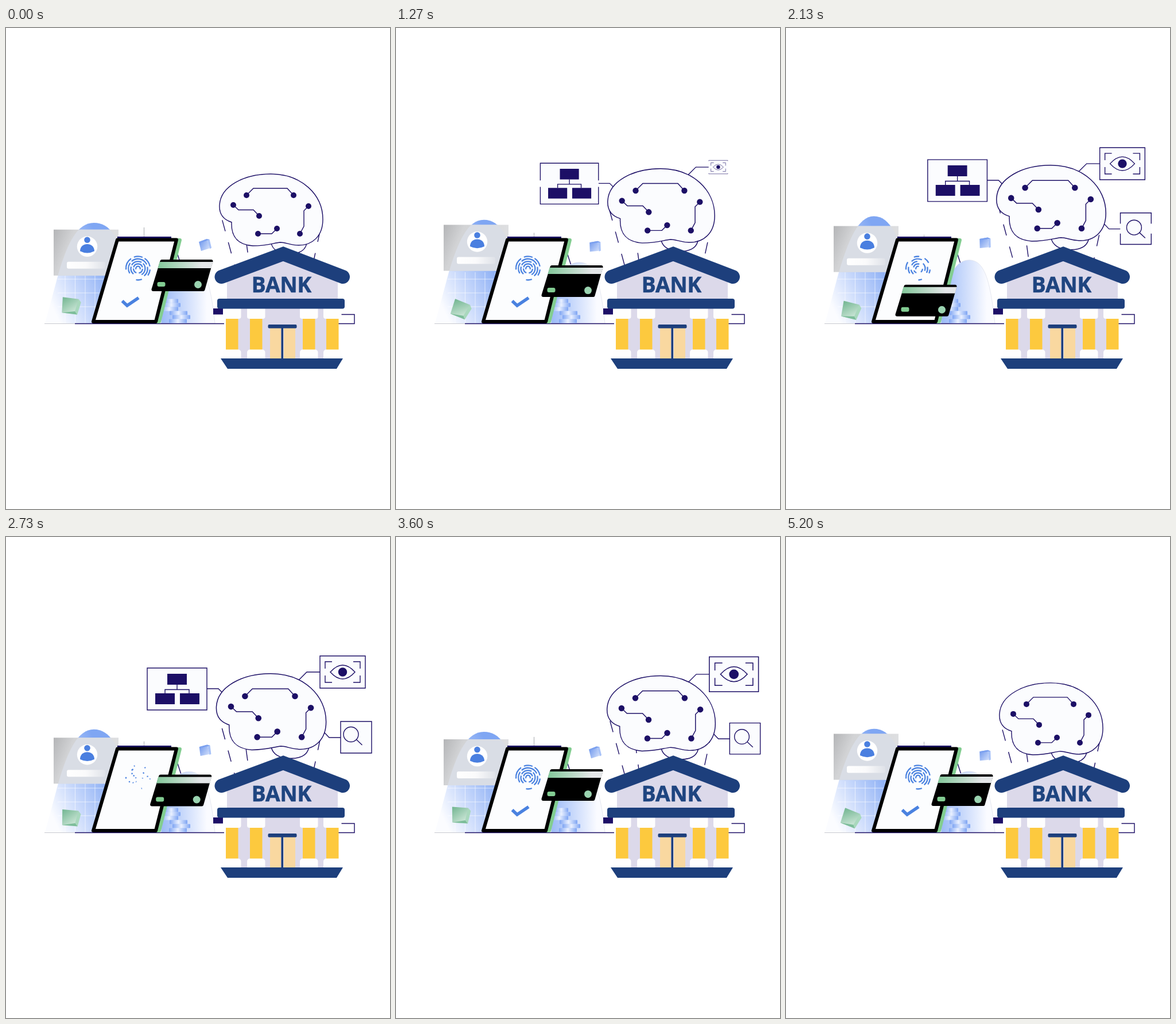
Write an HTML page that moves like this. It is 669x837 px and loops after 5270 ms.

```html
<!DOCTYPE html>
<html lang="en">
<head>
<meta charset="utf-8">
<title>Digital bank</title>
<style>
  html, body { margin: 0; width: 100%; height: 100%; overflow: hidden; background: #fff; }
  svg { display: block; width: 669px; height: 837px; }
  .ink { fill: none; stroke: #1c0f66; stroke-width: 1.4; }
  .solid { fill: #1c0f66; }
  .pale { fill: #fbfcfe; }
  .navy { fill: #1d3f7c; }
  .print { fill: none; stroke: #4a82e0; stroke-width: 2.3; }
</style>
</head>
<body>
<svg viewBox="0 0 669 837">
  <defs>
    <linearGradient id="hill" gradientUnits="userSpaceOnUse" x1="78" y1="480" x2="190" y2="425">
      <stop stop-color="#fbfcff"/><stop offset=".45" stop-color="#c3d5fb"/><stop offset="1" stop-color="#7fa6f3"/>
    </linearGradient>
    <linearGradient id="hill2" gradientUnits="userSpaceOnUse" x1="272" y1="0" x2="350" y2="0">
      <stop stop-color="#9dbbf8"/><stop offset="1" stop-color="#fafbff"/>
    </linearGradient>
    <linearGradient id="gray" x2="1" y2=".3">
      <stop stop-color="#b4b5b7"/><stop offset=".3" stop-color="#d2d3d5"/><stop offset="1" stop-color="#dfe0e2"/>
    </linearGradient>
    <linearGradient id="pill"><stop stop-color="#fff"/><stop offset=".5" stop-color="#fafafb"/><stop offset="1" stop-color="#dfe2e8"/></linearGradient>
    <linearGradient id="coin">
      <stop stop-color="#7fa5f3"/><stop offset=".5" stop-color="#e9f0ff"/><stop offset="1" stop-color="#7fa5f3"/>
    </linearGradient>
    <linearGradient id="stripe"><stop stop-color="#83c79a"/><stop offset=".8" stop-color="#e4e6e8"/></linearGradient>
    <linearGradient id="jade" x2="1" y2="1"><stop stop-color="#6fb48f"/><stop offset="1" stop-color="#dff0e6"/></linearGradient>
    <linearGradient id="azure" x2="1" y2="1"><stop stop-color="#6c95ec"/><stop offset="1" stop-color="#d3e0fb"/></linearGradient>
    <clipPath id="inHill"><path id="hillClip"/></clipPath>
  </defs>

  <!-- ground -->
  <path d="M67 514.5H120" stroke="#c9cad0"/>
  <path class="ink" d="M584 498.500H607V514.500H570"/>

  <!-- left hill with profile card -->
  <path id="hillL" fill="url(#hill)"/>
  <g clip-path="url(#inHill)" stroke="#fff" stroke-opacity=".6">
    <path d="M103 425V514M120.500 425V514M138 425V514M155 425V514M173 425V514M90 437H200M90 461H200M90 485H200"/>
  </g>
  <g id="profile">
    <rect x="83" width="113" height="80" fill="url(#gray)"/>
  </g>
  <g clip-path="url(#inHill)">
    <rect id="glass" x="83" width="113" height="80" fill="#d9dde5"/>
  </g>
  <g id="user">
    <circle cx="141.500" cy="29.500" r="17.700" fill="#fff"/>
    <g fill="#4a7fe0">
      <circle cx="141.500" cy="18" r="5.300"/>
      <path d="M129 37.500C129 21 154 21 154 37.500Q141.500 44 129 37.500Z"/>
    </g>
    <rect x="106" y="56" width="67" height="12" rx="3" fill="url(#pill)"/>
  </g>

  <!-- right hill and coins -->
  <path class="ink" stroke-width="3" d="M290 366L306 416"/>
  <path id="hillR" fill="url(#hill2)" stroke="#dcdfe8" stroke-width=".7"/>
  <path class="ink" d="M120 514.500H380"/>
  <path class="solid" d="M361 488H380V498.500H361Z"/>
  <g id="coins" fill="url(#coin)"></g>

  <!-- tablet -->
  <path id="rod" stroke="#a9abb0"/>
  <path class="solid" d="M194 363H288V366H194Z"/>
  <path d="M200 369H303L267 511H160Z" fill="#82cd90" stroke="#82cd90" stroke-width="6" stroke-linejoin="round"/>
  <path d="M194 368.500H297L261 511H152Z" fill="#fcfdfe" stroke="#000" stroke-width="6" stroke-linejoin="round"/>
  <g id="finger"></g>
  <path id="tick" class="print" style="stroke-width:5.500" pathLength="1" d="M202.500 475L211 483L231 469.500"/>

  <!-- payment card -->
  <g id="card">
    <path d="M18 3H104L90 52H3Z" stroke="#000" stroke-width="6" stroke-linejoin="round"/>
    <path d="M14 4H107L104 15H11Z" fill="url(#stripe)"/>
    <rect x="10" y="39" width="14" height="8" rx="3" fill="#82cc92"/>
    <circle cx="81" cy="43.500" r="6.500" fill="#9ad3b0"/>
  </g>

  <g id="cubeG">
    <path d="M-15 -13L13 -14L15 13L-12 14Z" fill="url(#jade)"/>
    <path d="M13 -14L18 -9L15 13L10 8Z" fill="#a9d8bd"/>
    <path d="M-12 14L10 8L15 13Z" fill="#7dbd9a"/>
  </g>
  <g id="cubeB">
    <path d="M-9 -7L5 -9L7 8L-9 9Z" fill="url(#azure)"/>
    <path d="M5 -9L10 -7L10 8L7 9Z" fill="#a9c3f8"/>
    <path d="M-9 -7L5 -9L10 -7L-4 -5Z" fill="#7ba0ef"/>
  </g>

  <!-- callouts -->
  <g id="calls"></g>

  <!-- brain -->
  <g id="beams" class="ink" stroke-dasharray="20 20">
    <path d="M372 317L398 412"/><path d="M416 353L424 412"/><path d="M551 335L536 405"/>
  </g>
  <g id="brain">
    <path class="ink pale" style="fill:#fbfcfe" d="M462 374C464 386 476 393 494 393S522 386 524 374"/>
    <path class="ink" style="fill:#fbfcfe" d="M393 338C380 334 371 325 372 308C374 275 415 254 461 254C515 254 552 290 552 333C552 362 534 378 510 378C495 378 488 373 478 373C466 374 456 379 430 379C402 377 392 362 393 338Z"/>
    <path class="ink" d="M419 291L431 279H490L501 291M396 308L405 316.500H431L441 327M527 310L519 318V345L512 358M439 358H463L472 349"/>
    <g id="nodes" class="solid"></g>
  </g>

  <!-- bank -->
  <path d="M385 433L483 394L578 433V575H385Z" fill="#dcd9ea"/>
  <path d="M375.500 433L483 393L587 433" fill="none" stroke="#1d3f7c" stroke-width="24" stroke-linecap="round"/>
  <text x="480" y="460" text-anchor="middle" font-family="'Open Sans','Noto Sans',sans-serif" font-weight="700" font-size="37" fill="#1f4580" stroke="#1f4580" stroke-width=".7">BANK</text>
  <g id="columns"></g>
  <rect class="navy" x="368" y="471" width="222" height="17.500" rx="4"/>
  <path d="M460 521H479V575H460ZM484 521H504V575H484Z" fill="#f9d8a0"/>
  <path class="navy" d="M479.500 520H483V576H479.500Z"/>
  <rect class="navy" x="456.500" y="516" width="50" height="6.500" rx="2"/>
  <path class="navy" d="M374 575H587L576 593H386Z"/>
</svg>

<script>
const LOOP = 5270, SUB = 3930, TAU = Math.PI * 2;
const $ = id => document.getElementById(id);
const set = (id, attr, v) => $(id).setAttribute(attr, v);
const clamp = v => Math.min(1, Math.max(0, v));
const ramp = (t, a, b) => clamp((t - a) / (b - a));
const smooth = v => v * v * (3 - 2 * v);
const backIn = v => 2.70158 * v ** 3 - 1.70158 * v * v;
const backOut = v => 1 - backIn(1 - v);
const wave = (p, peak) => Math.cos(TAU * (p - peak) / SUB);

// Static repeats
$('nodes').innerHTML = [[419,291],[501,291],[396,308],[441,327],[527,310],[512,358],[439,358],[472,349]]
  .map(([x, y]) => `<circle cx="${x}" cy="${y}" r="5"/>`).join('');
$('coins').innerHTML = [[276,24],[272,32],[269,31],[285,31],[290,31],[284,31]]
  .map(([x, w], i) => `<rect x="${x}" y="${471.5 + i * 7}" width="${w}" height="7" rx="1"/>`).join('');
$('columns').innerHTML = [383, 425, 517, 558].map(x => `
  <path fill="#fdc93e" d="M${x} 505h21.500v56h-21.500z"/>
  <rect x="${x - 5}" y="485" width="31.500" height="21" rx="4" fill="#fefefe"/>
  <rect x="${x - 5}" y="559.500" width="31.500" height="19" rx="5" fill="#fefefe"/>`).join('');

const arc = (r, a, b) => {
  const at = d => `${230 + r * Math.cos(d * TAU / 360)} ${418.5 + r * Math.sin(d * TAU / 360)}`;
  return `<path class="print" pathLength="1" d="M${at(a)}A${r} ${r} 0 ${+(b - a > 180)} 1 ${at(b)}"/>`;
};
$('finger').innerHTML = [
  [21,175,235],[21,250,292],[21,303,350],[21,5,35],[16.7,150,215],[16.7,228,335],[16.7,350,410],
  [12.4,130,195],[12.4,208,300],[12.4,315,420],[8,110,180],[8,195,345],[8,5,80],[3.800,160,380],[20,70,100]
].map(a => arc(...a)).join('');

// Callouts: box, connector drawn from the brain, times in and out
const calls = [
  { box: [246,228,104,73], from: 350, line: 'M390 284L370 264H350', start: 600, leave: 2750, gone: 3300,
    art: `<path class="solid" d="M281 238h34v19h-34zM260 272h34v19h-34zM303 272h34v19h-34z"/>
          <path class="ink" d="M298 257V265M277 272V265.500H319V272"/>` },
  { box: [547,207,79,56], from: 547, line: 'M502 257L524 235H547', start: 1220, leave: 3380, gone: 3900,
    art: `<path class="ink" d="M556 229V217H568M605 217H617V229M617 241V253H605M568 253H556V241M565 235Q586.500 211 608 235Q586.500 259 565 235Z"/>
          <circle class="solid" cx="586.500" cy="235" r="7.700"/>` },
  { box: [583,321,54,55], from: 583, line: 'M543 328L563 349H583', start: 1650, leave: 4270, gone: 4870,
    art: `<g id="lens" class="ink"><circle cx="604" cy="345" r="13"/><path d="M613.500 354L623.500 363.500"/></g>` }
];
$('calls').innerHTML = calls.map(({ box: [x, y, w, h], line, art }, i) => `
  <path id="line${i}" class="ink" pathLength="1" d="${line}"/>
  <g id="box${i}">
    <path class="pale" d="M${x} ${y}h${w}v${h}h${-w}z"/>
    <path id="frame${i}" class="ink" pathLength="200" d="M${x} ${y + h / 2}v${-h / 2}h${w}v${h}h${-w}z"/>
    ${art}
  </g>`).join('');

const scaleAt = (k, x, y) => `translate(${x} ${y}) scale(${k}) translate(${-x} ${-y})`;
const trim = (el, v) => {
  el.style.strokeDasharray = `${v} 9`;
  el.style.visibility = v > 0 ? 'visible' : 'hidden';
};

function drawBrain(t) {
  const grow = 1 + 0.062 * ((1 - Math.cos(TAU * t / LOOP)) / 2) ** 0.75;
  set('brain', 'transform', scaleAt(grow, 461, 517));
  set('calls', 'transform', scaleAt(grow / 1.062, 461, 517));
  set('beams', 'stroke-dashoffset', 80 * t / LOOP - 18);

  calls.forEach(({ box, from, start, leave, gone }, i) => {
    const size = t < leave ? backOut(ramp(t, start, start + 480)) : 1 - backIn(ramp(t, leave, gone));
    const gap = 40 * (1 - ramp(t, start, start + 800));
    set('box' + i, 'transform', scaleAt(Math.max(0, size), from, i == 1 ? 235 : i == 2 ? 349 : box[1] + box[3] / 2));
    set('frame' + i, 'stroke-dasharray', `0 ${gap / 2} ${100 - gap} ${gap} ${100 - gap} ${gap / 2}`);
    trim($('line' + i), ramp(t, start - 250, start) - ramp(t, gone - 100, gone + 80));
  });
  const a = TAU * (t - 2130) / 1200;
  set('lens', 'transform', `translate(${3 * Math.cos(a)} ${1.5 * Math.cos(a)})`);
}

function drawDesk(p) {
  const h = (1 - wave(p, 0)) / 2, rise = h ** 2.6;

  const top = 339 - 12 * rise;
  const hill = `M68 514L92 425C108 372 125 ${top} 153 ${top}C182 ${top} 197 365 215 425L238 514Z`;
  set('hillL', 'd', hill);
  set('hillClip', 'd', hill);
  const top2 = 411 - 7.5 * rise;
  set('hillR', 'd', `M270 514C276 440 292 ${top2} 319 ${top2}S356 440 364 514Z`);

  const y = 347.2 + 5 * wave(p, 3450);
  set('profile', 'transform', `translate(0 ${y})`);
  set('user', 'transform', `translate(0 ${y})`);
  set('glass', 'y', y);
  set('rod', 'd', `M240.500 ${347 + 13 * h}V364`);

  const tap = smooth(ramp(p, 1500, 2050)) - smooth(ramp(p, 2200, 2800));
  set('card', 'transform', `translate(${253.5 - 63 * tap} ${403 + 14 * h + 30 * tap})`);

  const print = p < 2600 ? 1 - ramp(p, 1900, 2500) : ramp(p, 2670, 3200);
  for (const el of $('finger').children) trim(el, print);
  trim($('tick'), p < 2600 ? 1 - ramp(p, 1800, 2050) : ramp(p, 3150, 3450));

  set('cubeG', 'transform', `translate(111.500 ${483.5 + 8 * h}) rotate(${14 + 10 * wave(p, 1270)})`);
  set('cubeB', 'transform', `translate(346.500 ${376 + 5 * wave(p, 850)}) rotate(${-7 - 7 * wave(p, 3700)})`);
}

function frame() {
  const t = performance.now() % LOOP;
  drawBrain(t);
  drawDesk(t % SUB);
  requestAnimationFrame(frame);
}
frame();
</script>
</body>
</html>
```
